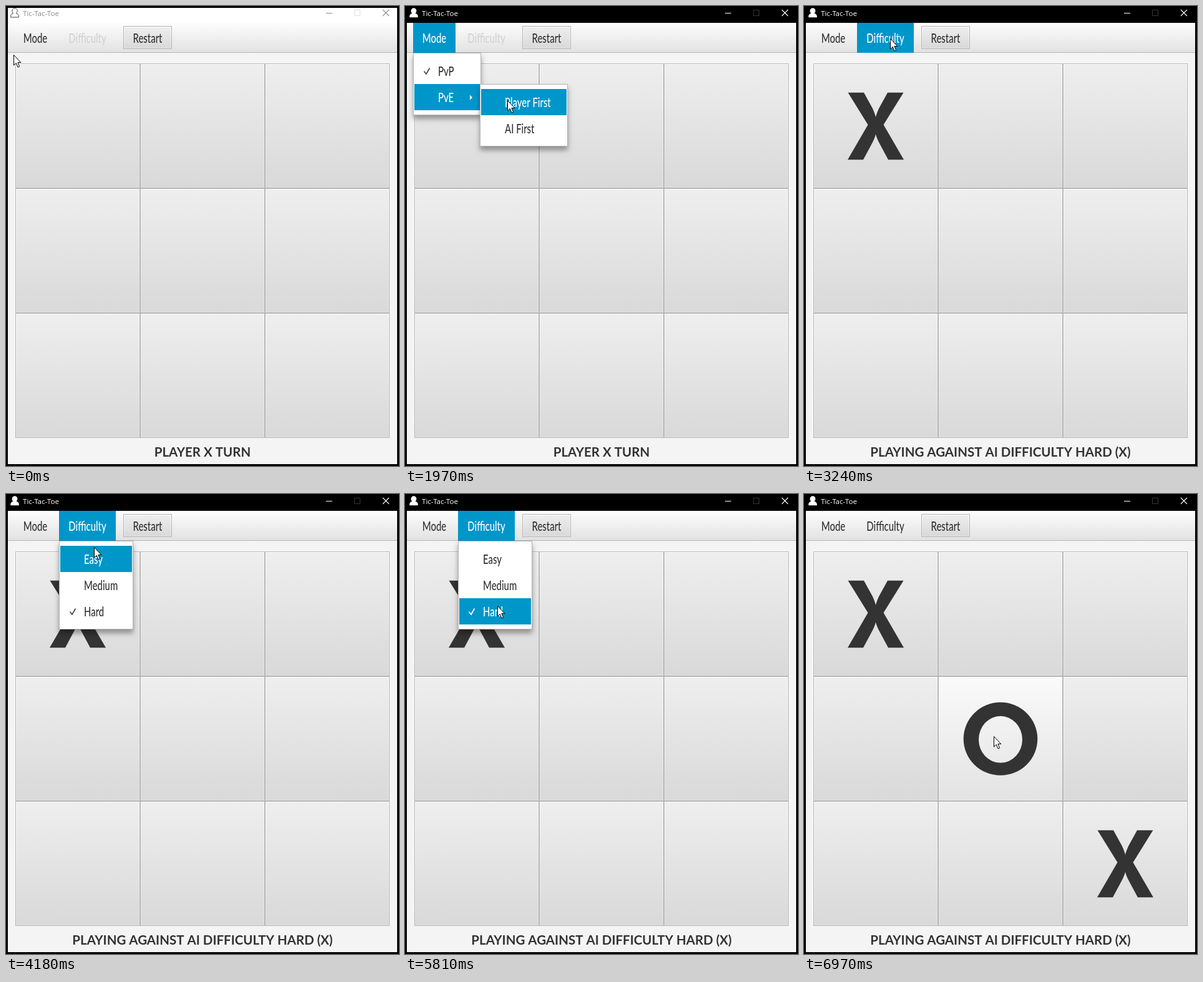
An HTML page with a canvas for the animation above (8 s loop, 630 by 737 pixels).

```html
<!DOCTYPE html>
<html lang="en">
<head>
<meta charset="utf-8">
<title>Tic-Tac-Toe</title>
<style>
html, body { margin: 0; width: 100%; height: 100%; overflow: hidden; background: #000; }
canvas { display: block; }
</style>
</head>
<body>
<canvas id="stage" width="630" height="737"></canvas>
<script>
const ctx = document.getElementById('stage').getContext('2d');
const LOOP = 8000, INK = '#323232', BLUE = '#0096c9';
const CONDENSED = 0.71; // one narrow face for the whole menu

// pointer path: time, x, y
const PATH = [
  [30, 12, 78], [200, 27, 69], [440, 41, 61], [990, 41, 61], [1020, 41, 64],
  [1250, 52, 107], [1390, 52, 107], [1540, 60, 127], [1700, 67, 134], [1840, 67, 134],
  [1970, 164, 151], [2130, 182, 168], [2360, 190, 191], [2670, 190, 191],
  [2950, 160, 112], [3240, 138, 52], [3930, 138, 52], [4180, 141, 85],
  [4750, 141, 179], [4840, 141, 182], [5160, 141, 182], [5450, 145, 143],
  [5810, 148, 179], [6030, 148, 179], [6400, 228, 288], [6830, 304, 388]
];

const ARROW = new Path2D('M.5 .5V17L4.3 13.4L7 20L9.6 19L6.9 12.5H11.8Z');
const MARK_X = new Path2D('M-44.5-53.5H-19L-5-28Q-1-19 0-14Q1-19 5-28L19-53.5H44.5L12.5-2L45 54H20' +
  'L5 26Q1 18 0 13Q-1 18-5 26L-20 54H-45L-12.5-2Z');
const PERSON = new Path2D('M7.5 18V16.5C7.5 13.5 9.5 12.5 11.7 11.9C8.5 9 9.6 3.5 14 3.5' +
  'C18.4 3.5 19.5 9 16.3 11.9C18.5 12.5 20.5 13.5 20.5 16.5V18Z');
const MARK_O = new Path2D();
MARK_O.ellipse(0, 0, 57.3, 56.5, 0, 0, 7);
MARK_O.ellipse(0, 1, 33.8, 36.2, 0, 0, 7);

function pointer(t) {
  const i = PATH.findIndex(p => p[0] > t);
  if (i === 0) return { x: 12, y: 78 };
  const b = PATH[i < 0 ? PATH.length - 1 : i], a = i < 0 ? b : PATH[i - 1];
  const k = i < 0 ? 0 : (t - a[0]) / (b[0] - a[0]);
  return { x: Math.round(a[1] + (b[1] - a[1]) * k), y: Math.round(a[2] + (b[2] - a[2]) * k) };
}

const inside = (p, x, y, w, h) => p.x >= x && p.x < x + w && p.y >= y && p.y < y + h;

function rect(x, y, w, h, color) {
  ctx.fillStyle = color;
  ctx.fillRect(x, y, w, h);
}

function shade(x, y, w, h, top, bottom) {
  const g = ctx.createLinearGradient(0, y, 0, y + h);
  g.addColorStop(0, top);
  g.addColorStop(1, bottom);
  rect(x, y, w, h, g);
}

function text(s, x, y, font, color, align = 'left', narrow = 1) {
  ctx.save();
  ctx.translate(x, y);
  ctx.scale(narrow, 1);
  ctx.font = font;
  ctx.fillStyle = color;
  ctx.textAlign = align;
  ctx.fillText(s, 0, 0);
  ctx.restore();
}

const label = (s, x, y, color, align) =>
  text(s, x, y, '500 21px Lato, sans-serif', color, align, CONDENSED);

function line(color, width, ...pts) {
  ctx.strokeStyle = color;
  ctx.lineWidth = width;
  ctx.beginPath();
  pts.forEach(p => ctx.lineTo(...p));
  ctx.stroke();
}

function button(x, y, w, h, lit) {
  rect(x, y, w, h, '#b5b5b5');
  shade(x + 1, y + 1, w - 2, h - 2, '#fdfdfd', lit ? '#ececec' : '#e2e2e2');
  shade(x + 2, y + 2, w - 4, h - 4, lit ? '#fafafa' : '#eeeeee', lit ? '#e3e3e3' : '#d9d9d9');
}

function titleBar(active) {
  if (!active) rect(3, 3, 624, 25, '#fff');
  const ink = active ? '#fff' : '#8c8c8c';
  ctx.fillStyle = '#fff';
  ctx.fill(PERSON);
  ctx.strokeStyle = active ? '#fff' : '#444';
  ctx.lineWidth = active ? 0.5 : 1;
  ctx.stroke(PERSON);
  text('Tic-Tac-Toe', 27, 16, '11.6px "Open Sans", sans-serif', ink);
  line(ink, 1, [513, 11.5], [523, 11.5]);
  ctx.strokeStyle = active ? '#333' : '#e2e2e2';
  ctx.strokeRect(558.5, 6.5, 9, 9);
  line(ink, 1.1, [604, 6], [614, 16]);
  line(ink, 1.1, [614, 6], [604, 16]);
}

function toolbar(p, menu, enabled) {
  shade(3, 27, 624, 47, '#fdfdfd', '#e2e2e2');
  rect(3, 74, 624, 1, '#b5b5b5');
  const entry = (name, x, w, on, color) => {
    if (on) rect(x, 27, w, 48, BLUE);
    label(name, x + w / 2, 59, on ? '#fff' : color, 'center');
  };
  entry('Mode', 13, 68, menu === 'mode' || inside(p, 13, 27, 68, 48), INK);
  entry('Difficulty', 85, 91, menu === 'difficulty' || (enabled && inside(p, 85, 27, 91, 48)),
    enabled ? INK : '#d2d2d2');
  button(188, 32, 78, 37);
  label('Restart', 227, 59, INK, 'center');
}

function popup(x, y, w, items, chosen, checked, arrow) {
  const h = items.length * 42 + 16;
  ctx.save();
  ctx.shadowColor = 'rgba(0,0,0,.36)';
  ctx.shadowBlur = 8;
  ctx.shadowOffsetY = 6;
  rect(x, y, w, h, '#b5b5b5');
  ctx.restore();
  rect(x + 1, y + 1, w - 2, h - 2, '#fff');
  items.forEach((name, i) => {
    const top = y + 8 + i * 42, on = i === chosen, mark = on ? '#fff' : '#4b4b4b';
    if (on) rect(x + 2, top, w - 4, 42, BLUE);
    label(name, x + 40, top + 29, on ? '#fff' : INK);
    if (i === checked) line(mark, 1.8, [x + 17.5, top + 21.5], [x + 21, top + 26], [x + 26.5, top + 16.5]);
    if (i === arrow) {
      ctx.fillStyle = mark;
      ctx.fill(new Path2D(`M${x + 91} ${top + 17.5}l4 4l-4 4z`));
    }
  });
}

const itemAt = (p, y) => Math.floor((p.y - y - 8) / 42);

function board(p, marks, free) {
  for (let i = 0; i < 9; i++) {
    const x = 15 + i % 3 * 200, y = 92 + Math.floor(i / 3) * 200, mark = marks[i];
    const lit = mark && free && inside(p, x, y, 200, 200);
    button(x, y, 200, 200, lit);
    if (!mark) continue;
    ctx.save();
    ctx.translate(x + 100, y + 100.3);
    if (lit) ctx.scale(1.035, 1.035);
    ctx.fillStyle = '#333';
    ctx.fill(mark === 'X' ? MARK_X : MARK_O, 'evenodd');
    ctx.restore();
  }
}

function draw(t) {
  const p = pointer(t), versusAI = t >= 2670;
  const menu = t >= 470 && t < 2670 ? 'mode' : t >= 3490 && t < 6030 ? 'difficulty' : '';
  const marks = t < 2670 ? {} : t < 6030 ? { 0: 'X' } : t < 6970 ? { 8: 'X' } : { 0: 'X', 4: 'O', 8: 'X' };

  rect(0, 0, 630, 737, '#000');
  rect(3, 27, 624, 707, '#f4f4f4');
  titleBar(t >= 440);
  toolbar(p, menu, versusAI);
  board(p, marks, !menu);
  text(versusAI ? 'PLAYING AGAINST AI DIFFICULTY HARD (X)' : 'PLAYER X TURN', 315, 722,
    'bold 20.5px Lato, sans-serif', INK, 'center');

  if (menu === 'mode') {
    const sub = t >= 1530;
    popup(13, 75, 109, ['PvP', 'PvE'], sub ? 1 : itemAt(p, 75), 0, 1);
    if (sub) popup(120, 125, 141, ['Player First', 'AI First'], p.x >= 122 ? itemAt(p, 125) : -1);
  } else if (menu) {
    popup(85, 75, 119, ['Easy', 'Medium', 'Hard'], itemAt(p, 75), 2);
  }

  ctx.save();
  ctx.translate(p.x, p.y);
  ctx.fillStyle = '#fff';
  ctx.fill(ARROW);
  ctx.strokeStyle = '#000';
  ctx.lineWidth = 1;
  ctx.stroke(ARROW);
  ctx.restore();
}

function frame() {
  draw(performance.now() % LOOP);
  requestAnimationFrame(frame);
}
frame();
</script>
</body>
</html>
```
